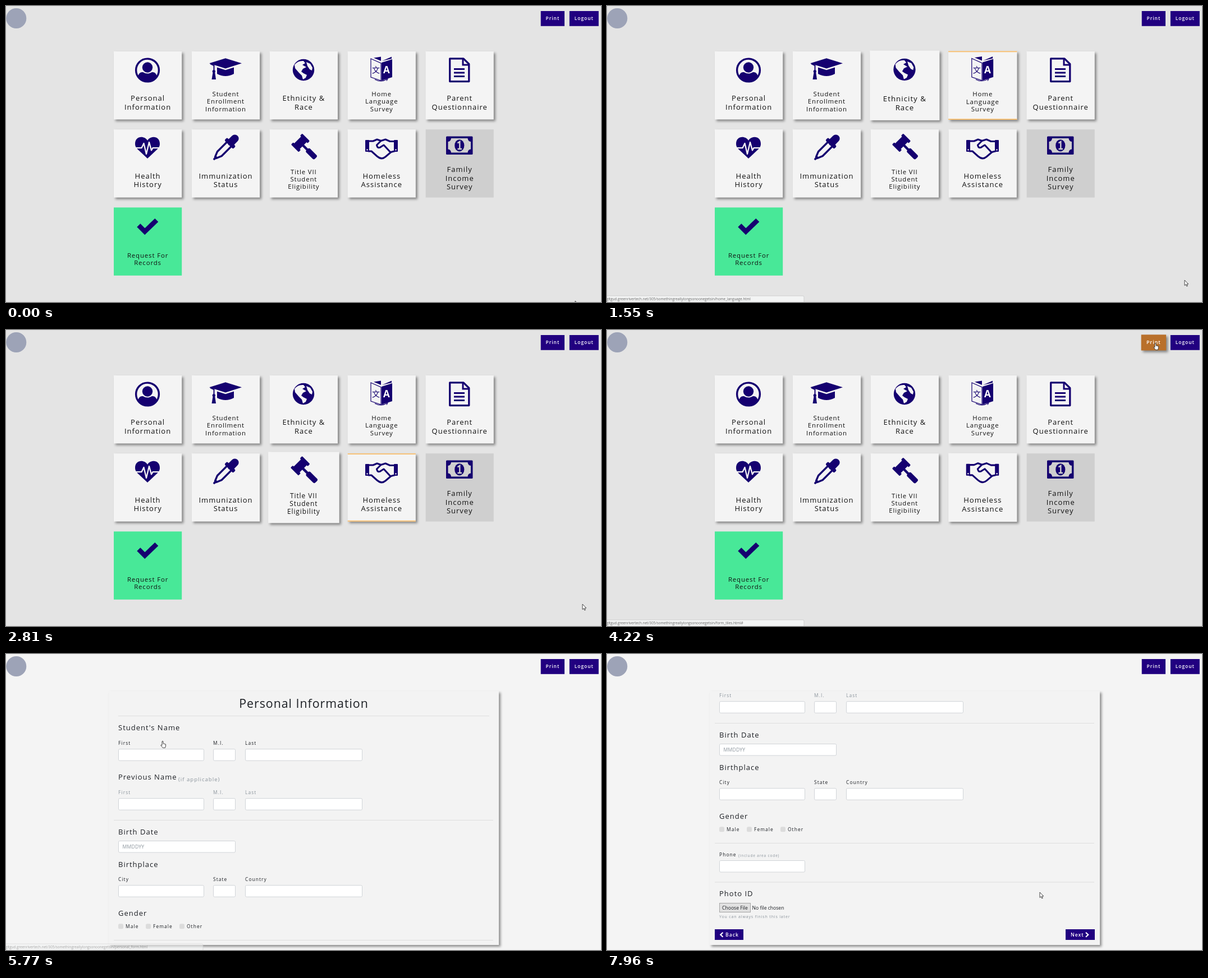
These frames come from a looping animation (1060x528 px, 8 s). An HTML page:

```html
<!DOCTYPE html>
<html lang="en">
<head>
<meta charset="utf-8">
<title>Enrollment forms</title>
<style>
  html, body { margin: 0; width: 100%; height: 100%; overflow: hidden; background: #e4e4e4; }
  svg { display: block; width: 1060px; height: 528px; }
  text { font-family: "Open Sans", "Noto Sans", sans-serif; white-space: pre; }
  .raised { filter: drop-shadow(3px 3px 2px rgba(0,0,0,.42)); }
</style>
</head>
<body>
<svg id="stage" viewBox="0 0 1060 528"></svg>
<script>
const STEP = 156.1, LOOP = 8000;
const INK = '#150070', BUTTON = '#210080', PAPER = '#f4f4f4', GREY = '#8b949c';

const rect = (x, y, w, h, fill, more = '') =>
  `<rect x="${x}" y="${y}" width="${w}" height="${h}" fill="${fill}" ${more}/>`;
const path = (d, fill = INK, more = '') => `<path d="${d}" fill="${fill}" ${more}/>`;
const line = (d, width, colour = INK, more = '') =>
  path(d, 'none', `stroke="${colour}" stroke-width="${width}" ${more}`);
const circle = (x, y, r, fill = INK) => `<circle cx="${x}" cy="${y}" r="${r}" fill="${fill}"/>`;
const label = (s, x, y, size, gap = 1, fill = '#1c1f24', more = '') =>
  `<text x="${x}" y="${y}" font-size="${size}" letter-spacing="${gap}" fill="${fill}" ${more}>${s}</text>`;
const centred = (s, x, y, size, gap, fill, more = '') =>
  label(s, x + gap / 2, y, size, gap, fill, 'text-anchor="middle" ' + more);
const round = 'stroke-linejoin="round" stroke-linecap="round"';

// Icons in stage coordinates
const icons = {
  person: `<circle cx="252" cy="114.5" r="20.4" fill="none" stroke="${INK}" stroke-width="3.4"/>` +
    circle(252, 109.5, 9.2) +
    path('M235 126Q237 117 244 118Q252 123 260 118Q267 117 269 126A20 20 0 0 1 235 126Z'),
  cap: path('M391 93.3L420 102.3 391 111.5 362 102.3ZM376 109.5L391 114.3 406 109.5V121Q391 129 376 121Z') +
    line('M364 103L370.5 106V117', 2) + circle(370.3, 116.5, 2.6) + path('M368.8 117H372L374 131H366.5Z'),
  globe: circle(530, 114, 19.2) +
    path('M514 105Q520 97 530 98L533 102 528 105 535 109 529 112 526 117 530 120 536 123 534 128 529 131 527 124 521 118 515 111Z' +
      'M535 100L542 103 546 110 545 115 541 113 537 107Z', PAPER),
  language: line('M650 94L668 102V133L650 127Z', 1.2) +
    path('M655 92.5L668 90.5 668 98ZM669 101L688 95V127L669 133Z') +
    path('M670 98L687 90.5V94Z') +
    `<text x="652" y="119" font-size="14" fill="${INK}" style="font-family:'Noto Sans CJK SC','Noto Sans CJK JP',sans-serif">文</text>` +
    label('A', 672, 120, 17, 0, '#fff', 'font-weight="700"') +
    line('M657 131Q668 137 679 130.5M675.5 129.5L680 130 678 133.5', 1.1),
  page: line('M790.7 93.8H815L824.8 103.5V134.6H790.7Z', 3.3, INK, round) +
    line('M814 94V105H825', 3) + line('M798 112.5H817M798 119H817M798 125.5H817', 2.8),
  heart: path('M252 240C247 231 230 231 230 246C230 252 234 255 236 257L252 272 268 257C270 255 274 252 274 246C274 231 257 231 252 240Z') +
    line('M229 253.2H241.5L245.5 245 250 264 255 243 259 257.5 261.5 253.2H275', 2.3, PAPER, 'stroke-linejoin="round"'),
  dropper: `<g transform="translate(391 253) rotate(45)">` +
    rect(-7, -30.5, 14, 23, INK, 'rx="7"') + rect(-11, -15, 22, 7, INK, 'rx="2.5"') +
    line('M-5.5 -9V15L-1.8 24H1.8L5.5 15V-9', 3.4) + path('M-3 22H3L1.5 30H-1.5Z') + '</g>',
  gavel: `<g transform="translate(524.5 244) rotate(45)">` +
    rect(-7, -11, 14, 22, INK) + rect(-9.5, -14, 19, 5.5, INK, 'rx="1.5"') + rect(-9.5, 8.5, 19, 5.5, INK, 'rx="1.5"') +
    rect(5, -2.2, 14, 4.4, INK) + rect(17, -4.8, 21.5, 9.6, INK, 'rx="3"') + '</g>',
  hands: rect(640, 239, 7, 21, INK, 'rx="1"') + rect(691, 239, 7, 21, INK, 'rx="1"') +
    circle(643.5, 256.5, 1.2, PAPER) + circle(694.5, 256.5, 1.2, PAPER) +
    line('M646 241H654L661 238 668 240.5 676 238 684 241.5H692M646 259H651L661 268Q669 275 676 269L686 260.5 692 259' +
      'M668 240.5L660.5 248Q662 256 669 250.5L673 248 685 261', 3.1, INK, round),
  bill: rect(784, 232.5, 47.5, 32.5, INK, 'rx="1.5"') +
    path('M793 236H822.5Q823 241.5 828 242V255.5Q823 256 822.5 261.5H793Q792.5 256 787.5 255.5V242Q792.5 241.5 793 236Z', '#cfcfcf') +
    `<ellipse cx="807.8" cy="248.8" rx="8.6" ry="10.6" fill="${INK}"/>` +
    line('M804.5 244.5L808.3 242V255M804.5 255H812', 2.4, '#cfcfcf'),
  check: line('M236.3 391.3L247.3 402.3 268.3 382', 8.6)
};

// icon, lines of text, first baseline, small text, flat colour
const tiles = [
  ['person', 'Personal|Information', 169],
  ['cap', 'Student|Enrollment|Information', 161, 1],
  ['globe', 'Ethnicity &amp;|Race', 169],
  ['language', 'Home|Language|Survey', 161, 1],
  ['page', 'Parent|Questionnaire', 169],
  ['heart', 'Health|History', 307.7],
  ['dropper', 'Immunization|Status', 307.7],
  ['gavel', 'Title VII|Student|Eligibility', 299.5, 1],
  ['hands', 'Homeless|Assistance', 307.7],
  ['bill', 'Family|Income|Survey', 296, 0, '#cfcfcf'],
  ['check', 'Request For|Records', 448.5, 1, '#48e898']
].map(([icon, words, base, small, flat], i) => {
  const x = 192 + i % 5 * 138.9, y = 81 + Math.floor(i / 5) * 139.2, cx = x + 60.6;
  const text = words.split('|').map((s, k) => centred(s, cx - .5, base + k * (small ? 13.3 : 15.7),
    small ? 11.4 : 13, small ? .88 : 1, '#111')).join('');
  return { x, y, cx, cy: y + 60.7,
    body: rect(x, y, 121.2, 121.4, flat || PAPER, flat ? '' : 'class="raised"') + icons[icon] + text };
});

// tile, pointer enters, pointer leaves (in steps)
const hovers = [[0, 3.6, 5], [1, 5, 6.8], [2, 6.6, 8.9], [3, 9.5, 11.3], [4, 11.3, 12.5],
  [6, 13.2, 14.2], [7, 14.25, 17.25], [8, 18, 24.4],
  [3, 31.6, 32.6], [2, 32.6, 33.5], [1, 33.5, 34.6], [0, 34.6, 37]];

function drawTile(tile, i, n) {
  let level = 0, lit = false;
  for (const [k, a, b] of hovers) if (k === i && n >= a) {
    level = Math.max(level, (Math.min(n - a, b - a, 3) - Math.max(0, n - b)) / 3);
    lit ||= n < b;
  }
  const { x, y, cx, cy, body } = tile;
  const edges = lit ? rect(x, y, 121.2, 1.8, '#f8bd6c') + rect(x, y + 119.6, 121.2, 1.8, '#f8bd6c') : '';
  return `<g transform="translate(${cx} ${cy}) scale(${1 + .06 * level}) translate(${-cx} ${-cy})">${body}${edges}</g>`;
}

// Form page
const INPUT = 'stroke="#ccd0d4" stroke-width=".9" rx="2"';
const input = (x, y, w) => rect(x + .5, y + .5, w - 1, 20.5, '#fff', INPUT);
const rule = (x, y, w) => rect(x, y, w, 1, '#dedede');
const head = (s, y) => label(s, 200, y, 13);
const trio = (names, y, colour) => [[200, 153], [369, 40], [426, 209]].map(([x, w], i) =>
  label(names[i], x, y, 8.4, 1.1, colour) + input(x, y + 7.2, w)).join('');
const choice = (s, x) => rect(x, 481.3, 9, 9, '#dcdcdc', 'rx="2.5"') + label(s, x + 13, 489, 8.4, 1.1);
const nav = (s, x, w, tx, arrow) => rect(x, 664, w, 19, BUTTON) +
  label(s, tx, 677, 8.6, 1, '#fff', 'font-weight="600"') + line(arrow, 2.2, '#fff');
const form =
  centred('Personal Information', 530, 96, 21.3, 1) + rule(200, 110, 661) +
  head("Student's Name", 136.3) + trio(['First', 'M.I.', 'Last'], 162) +
  head('Previous Name', 224.3) + label('(if applicable)', 307, 226.5, 9.6, 1, GREY) +
  trio(['First', 'M.I.', 'Last'], 250, GREY) + rule(192, 296, 676) +
  head('Birth Date', 321.6) + input(200, 333, 209) + label('MMDDYY', 207.5, 347, 8.6, .2, GREY) +
  head('Birthplace', 379.6) + trio(['City', 'State', 'Country'], 405) +
  head('Gender', 467.3) + choice('Male', 200) + choice('Female', 249) + choice('Other', 309) +
  rule(192, 510, 676) + label('Phone', 200, 533.5, 8.4, 1.1) +
  label('(include area code)', 234, 535, 6.4, .9, GREY) + input(200, 541, 153) + rule(192, 579.5, 676) +
  head('Photo ID', 605.2) + rect(200.5, 617.5, 55, 16, '#e1e1e1', 'stroke="#a5a5a5"') +
  label('Choose File', 205, 628.7, 8.6, 0) + label('No file chosen', 258.5, 628.7, 8.6, 0) +
  label('You can always finish this later', 200, 643.7, 7, .85, GREY) +
  nav('Back', 192, 51, 211, 'M206.5 669.7L202.3 673.7 206.5 677.7') +
  nav('Next', 817, 52, 826, 'M853 669.7L857.2 673.7 853 677.7');

function drawForm(n) {
  const scroll = n < 44 ? 0 : [57, 114.5, 158][n - 44] ?? 173;
  return rect(0, 0, 1060, 528, PAPER) + rect(183, 66, 695, 453, '#f3f3f3', 'class="raised"') +
    `<clipPath id="card">${rect(183, 66, 695, 453, '#000')}</clipPath>` +
    `<g clip-path="url(#card)"><g transform="translate(0 ${-scroll})">${form}</g></g>`;
}

function button(s, x, w, hot) {
  const cx = x + w / 2;
  return `<g transform="translate(${cx} 22.3) scale(${hot ? 1.05 : 1})">` +
    rect(-w / 2, -13.3, w, 26.8, hot ? '#b9702b' : BUTTON, hot ? 'class="raised"' : '') +
    centred(s, -.5, 3, 8.4, 1, '#fff', 'font-weight="600"') + '</g>';
}

// Status bar: first step, page name (empty hides it)
const links = [[0, ''], [4, 'personal_form'], [6, 'enrollment'], [8, 'ethnicity'], [10, 'home_language'],
  [13, ''], [25, 'form_tiles'], [35, 'personal_form'], [38, '']];
function drawStatus(n) {
  const name = links.findLast(([from]) => n >= from)[1];
  if (!name) return '';
  return `<g opacity="${n === 37 ? .55 : 1}">` + rect(-2, 517, 353, 13, '#f3f4f4', 'stroke="#cfcfcf" rx="2"') +
    label(`gitgud.greenrivertech.net/305/somethingreallylongsonoonegetsin/${name}.html${name === 'form_tiles' ? '#' : ''}`,
      -1, 524.6, 6.3, 0, '#666') + '</g>';
}

// Pointer: step, x, y
const track = [[0, 1014, 526], [1, 1029, 489], [10, 1029, 489], [11, 1027, 489], [22, 1027, 489],
  [23, 900, 130], [24, 974, 23], [29, 974, 23], [30, 935, 38], [31, 840, 50], [32, 720, 75], [33, 570, 100],
  [34, 430, 126], [35, 330, 146], [36, 276, 155], [38, 276, 155], [43, 719, 214], [48, 719, 214], [51, 771, 425]];
const arrow = 'M0 0V9.5L2.2 7.6 3.8 11 5.3 10.3 3.8 7H6.8Z';
const hand = 'M2 1Q3 -.8 4 1V4.8L8.5 6V9L7.5 12.3H3.3L-.3 7.8Q0 6.4 2 8Z';
function drawPointer(n) {
  const k = Math.max(1, track.findIndex(([at]) => at >= n));
  const [a, x0, y0] = track[k - 1], [b, x1, y1] = track[k], p = (n - a) / (b - a);
  const linking = n >= 24 && n <= 29 || n >= 33 && n <= 38;
  return `<g transform="translate(${x0 + (x1 - x0) * p} ${y0 + (y1 - y0) * p})">` +
    path(linking ? hand : arrow, '#fff', 'stroke="#333" stroke-width=".9"') + '</g>';
}

const stage = document.getElementById('stage');
let shown = -1;
function frame(now) {
  const n = Math.min(51, Math.floor((now % LOOP + 18) / STEP));
  if (n !== shown) {
    shown = n;
    stage.innerHTML = (n < 37 ? rect(0, 0, 1060, 528, '#e4e4e4') + tiles.map((t, i) => drawTile(t, i, n)).join('') : drawForm(n)) +
      circle(18.3, 22, 18, '#9da3b7') +
      button('Print', 952.7, 42.3, n >= 24 && n < 30) + button('Logout', 1003.8, 52, false) +
      drawStatus(n) + drawPointer(n);
  }
  requestAnimationFrame(frame);
}
frame(performance.now());
</script>
</body>
</html>
```
